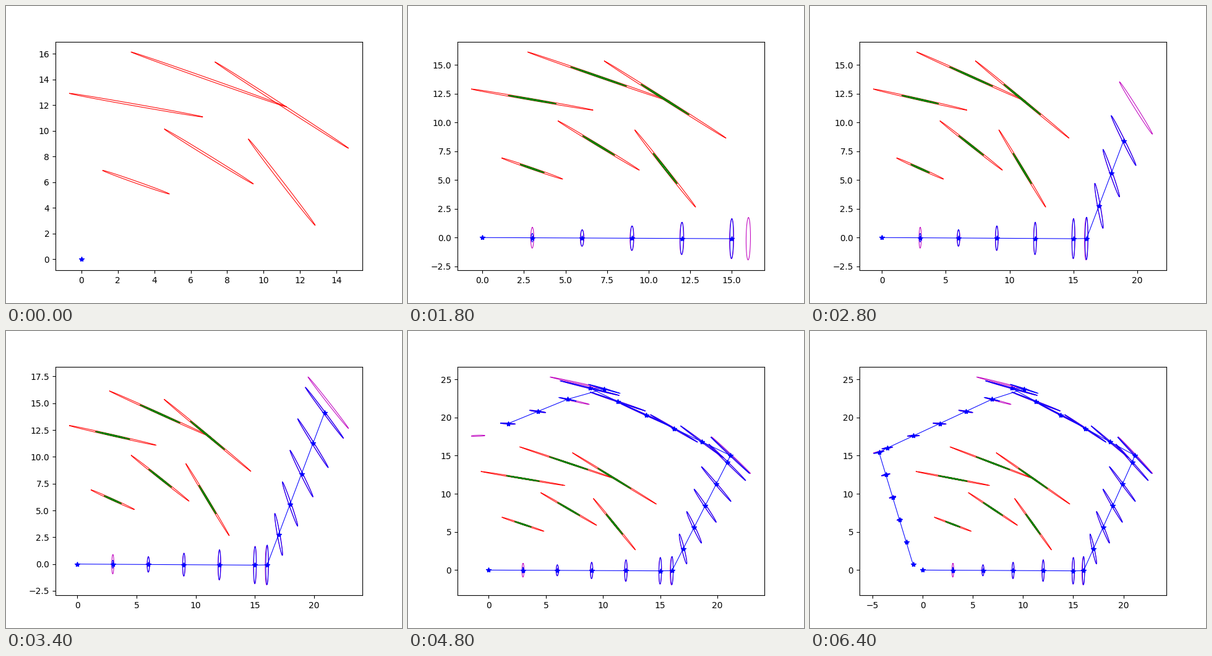
Animation, 640 px wide and 480 px high, one loop 6.6 s. Source, as a matplotlib script:

```python
import numpy as np
import matplotlib.pyplot as plt
from matplotlib.animation import FuncAnimation

LANDMARKS = [(3, 6), (3, 12), (7, 8), (7, 14), (11, 6), (11, 12)]

FRAMES = 33
STEPS = 29
LEG = 6  # five long strides and a short one a third as long

# Route corners (step, x, y); the robot walks straight between them
CORNERS = np.array([
    (0, 0, 0), (5, 15, -.1),
    (6, 16.03, -.08), (11, 20.87, 14.1),
    (12, 21.13, 15.03), (17, 8.84, 23.84),
    (18, 10.12, 23.74), (19, 6.9, 22.38), (23, -3.53, 16),
    (24, -4.36, 15.43), (29, -.97, .74),
])
POSES = np.column_stack([np.interp(range(STEPS + 1), CORNERS[:, 0], CORNERS[:, i])
                         for i in (1, 2)])

PHI = np.linspace(0, 2 * np.pi, 101)
LW = 0.75


def events_at(frame):
    """Filter events done so far: odd = prediction, even = update."""
    pace = np.interp(frame, [0, 9, 17, 21, 26, 32], [0, 11, 23, 35, 47, 58])
    return int(np.ceil(pace))


def spread(n):
    """Three-sigma angle about the start point after update n."""
    return np.interp(n, [1, 5, 10, 17, 18, 19, 29],
                     [.12, .115, .114, .1075, .058, .0335, .033])


def thickness(n):
    """Three-sigma radial error after update n."""
    return np.interp(n, [1, 2, 6, 13], [.07, .09, .11, .05])


def predicted(n):
    """Previous pose moved on by the stride of the current leg."""
    last = (n - 1) // LEG * LEG + LEG - 1
    stride = POSES[last] - POSES[last - 1]
    return POSES[n - 1] + stride / (1 if n % LEG else 3)


def ellipse(center, angle, minor, color):
    """Ellipse whose long axis is perpendicular to the ray from the origin."""
    x, y = center
    r = np.hypot(x, y)
    along, across = angle * np.cos(PHI), minor / r * np.sin(PHI)
    ax.plot(x - y * along + x * across, y + x * along + y * across,
            c=color, lw=LW)


def start():
    ax.plot(.05 * np.cos(PHI), .05 * np.sin(PHI), c="b", lw=LW)
    ax.plot(0, 0, "*b")
    for mark in LANDMARKS:
        ellipse(mark, .305, .075, "r")


def predict(n):
    angle = .3 if n == 1 else spread(n - 1)
    ellipse(predicted(n), angle, thickness(n) + .02, "m")


def update(n):
    ellipse(POSES[n], spread(n), thickness(n), "b")
    ax.plot(*POSES[n - 1:n + 1].T, c="b", lw=LW)
    ax.plot(*POSES[n], "*b")
    for mark in LANDMARKS:
        ellipse(mark, spread(n), .03 + .025 / n, "g")


def draw(frame):
    ax.clear()
    start()
    for event in range(1, events_at(frame) + 1):
        step = (event + 1) // 2
        (predict if event % 2 else update)(step)
    return []


fig, ax = plt.subplots(figsize=(6.4, 4.8), dpi=100)
anim = FuncAnimation(fig, draw, frames=FRAMES, init_func=lambda: [],
                     interval=200, repeat=True, repeat_delay=0)
plt.show()
```
